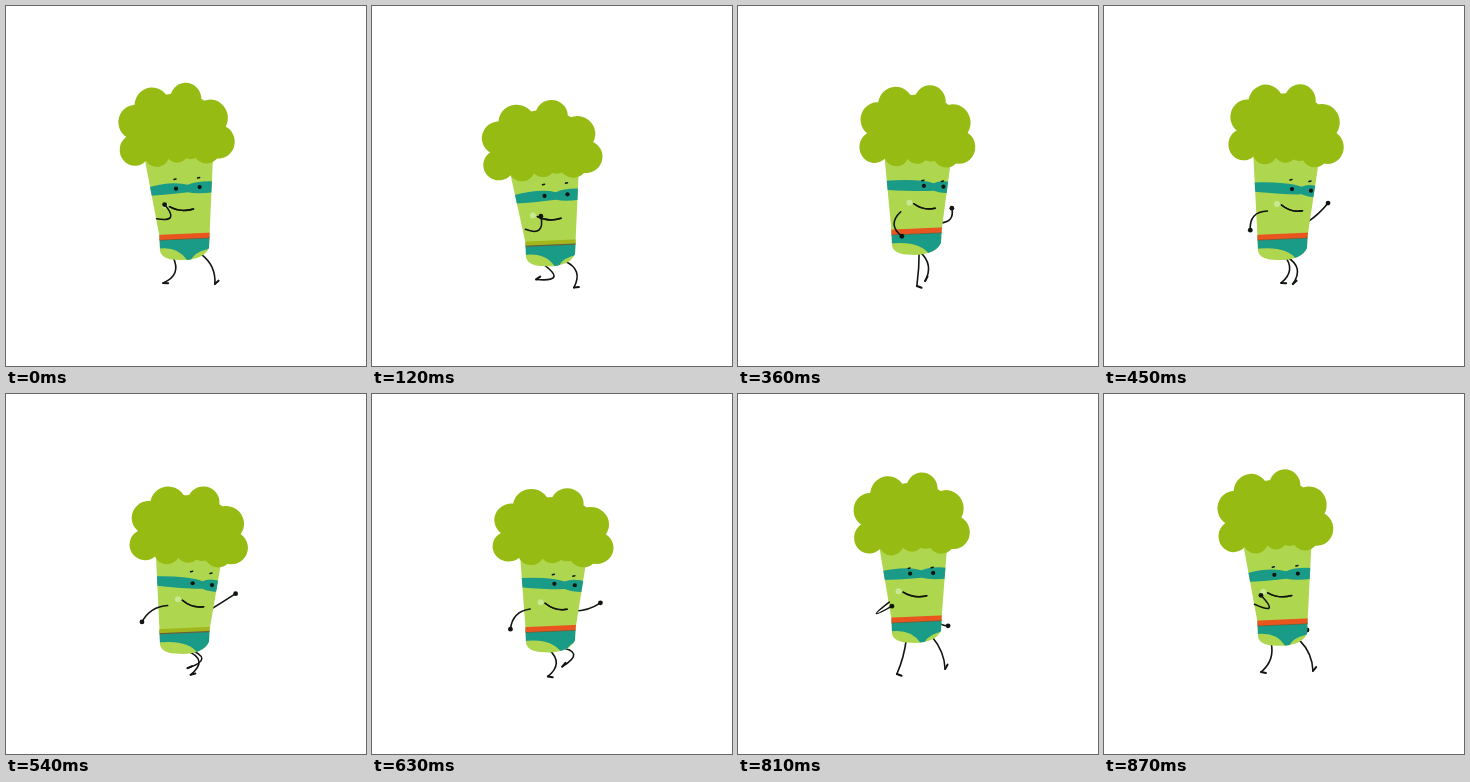
Animation, 360 px wide and 360 px high, one loop 900 ms. Source, as an HTML page with a canvas:

```html
<!DOCTYPE html>
<html lang="en">
<head>
<meta charset="utf-8">
<title>Jogging broccoli</title>
<style>
html, body { margin: 0; width: 100%; height: 100%; overflow: hidden; background: #fff; }
canvas { display: block; }
</style>
</head>
<body>
<canvas id="stage" width="360" height="360"></canvas>
<script>
const ctx = document.getElementById('stage').getContext('2d');
const LOOP = 900, STEP = 30;
const INK = '#10150f', HAIR = '#96bc14', STEM = '#afd64f', TEAL = '#199b88';
const BELT = '#e8551f', OLIVE = '#a3b71c', SEAM = '#6b6038', CHEEK = '#c8e892';

// Hair lobes around the hair centre: x, y, radius
const LOBES = [
  [-22, -22, 18], [13, -25, 16], [36, -4, 18], [42, 20, 16.5], [-41, -8, 17],
  [-44, 19, 15.5], [-22, 25, 13], [-1, 24, 12], [13, 21, 13], [29, 26, 14]
];

// Cosine around a mean that peaks at the given time, `beats` times per loop.
function wave(time, mean, amp, peak, beats = 1) {
  return mean + amp * Math.cos((time - peak) / LOOP * beats * 2 * Math.PI);
}

function stroke(width, color, trace) {
  ctx.beginPath();
  trace();
  ctx.lineWidth = width;
  ctx.strokeStyle = color;
  ctx.stroke();
}

function line(width, color, x1, y1, x2, y2) {
  stroke(width, color, () => { ctx.moveTo(x1, y1); ctx.lineTo(x2, y2); });
}

function oval(color, x, y, rx, ry = rx) {
  ctx.fillStyle = color;
  ctx.beginPath();
  ctx.ellipse(x, y, rx, ry, 0, 0, 7);
  ctx.fill();
}

// A limb bows out sideways the more its ends come together.
function limb(x1, y1, x2, y2, reach, bend) {
  const dx = x2 - x1, dy = y2 - y1, d = Math.hypot(dx, dy);
  const bow = 2 * bend * Math.max(0, reach - d) / d;
  stroke(1.6, INK, () => {
    ctx.moveTo(x1, y1);
    ctx.quadraticCurveTo((x1 + x2) / 2 + dy * bow, (y1 + y2) / 2 - dx * bow, x2, y2);
  });
}

function drawLeg(time, hipShift, footShift, hipY) {
  const x = wave(time, 193, 16, -20) + footShift, y = wave(time, 277.5, 5, 210);
  const toe = wave(time, -20, 45, 300) * Math.PI / 180;
  limb(wave(time, 188, 8, -10) + hipShift, hipY, x, y, 37, .8);
  line(2, INK, x, y, x + 5 * Math.cos(toe), y + 5 * Math.sin(toe));
}

function drawArm(x1, y1, x2, y2, reach, bend) {
  limb(x1, y1, x2, y2, reach, bend);
  oval(INK, x2, y2, 2.4);
}

function drawHair(x, y, squash, tilt) {
  ctx.save();
  ctx.translate(x, y);
  ctx.scale(1 + squash, 1 - squash);
  ctx.rotate(tilt * Math.PI / 180);
  oval(HAIR, 0, 0, 43, 32);
  LOBES.forEach(lobe => oval(HAIR, ...lobe));
  ctx.restore();
}

function drawPants(belt, bottom, crotch) {
  ctx.fillStyle = TEAL;
  ctx.beginPath();
  ctx.moveTo(150, belt);
  ctx.lineTo(150, bottom - 11);
  ctx.quadraticCurveTo(crotch - 12, bottom - 15, crotch - 2, bottom);
  ctx.lineTo(crotch + 2, bottom);
  ctx.quadraticCurveTo(crotch + 6, bottom - 9, 207, bottom - 12);
  ctx.lineTo(207, belt);
  ctx.fill();
  const low = bottom > 259.5;
  line(1.5, SEAM, 150, belt + 3.5, 207, belt + 1);
  line(low ? 4 : 5, low ? OLIVE : BELT, 150, belt + 1, 207, belt - 1.5);
}

function drawMask(maskAt, eye1, eye2) {
  const bridge = (eye1 + eye2) / 2;
  ctx.fillStyle = TEAL;
  ctx.beginPath();
  ctx.moveTo(140, maskAt(140) - 3.5);
  ctx.quadraticCurveTo(eye1 - 5, maskAt(eye1) - 9, bridge, maskAt(bridge) - 4);
  ctx.quadraticCurveTo(eye2, maskAt(eye2) - 9, 220, maskAt(220) - 4);
  ctx.lineTo(220, maskAt(220) + 4);
  ctx.quadraticCurveTo(eye2, maskAt(eye2) + 7, bridge, maskAt(bridge) + 3.5);
  ctx.quadraticCurveTo(eye1 - 5, maskAt(eye1) + 5, 140, maskAt(140) + 4.5);
  ctx.fill();
}

function draw(time) {
  const bounce = (mean, amp, peak) => wave(time, mean, amp, peak, 2);
  const sway = wave(time, 0, 1, 520), turn = wave(time, 0, 1, 460);
  const hairX = 176.3 + 7.5 * sway;
  const hairY = bounce(127, 8, 162) - wave(time, 0, 2, 0, 4);
  const bottom = bounce(254.5, 5.8, 119), belt = bottom - 23.5;
  const eye1 = 179 + 9 * turn, eye2 = 200.3 + 6.7 * turn;
  const maskY = bounce(186, 5.5, 144), mouthY = bounce(206, 6.5, 162);
  const maskAt = x => maskY + (.5 + 5 * sway) * (x - hairX) / 60;

  ctx.fillStyle = '#fff';
  ctx.fillRect(0, 0, 360, 360);
  ctx.lineCap = ctx.lineJoin = 'round';

  drawArm(202, 217, wave(time, 212, 18, 570), wave(time, 217, 20, 15), 33, -.4);
  drawLeg(time, 0, 0, bottom - 5);
  drawLeg(time + LOOP / 2, -13, -20, bottom - 3);

  // Stem; everything worn on it is clipped to its outline.
  ctx.save();
  ctx.beginPath();
  ctx.moveTo(143.5 + 6.5 * sway, hairY + 28);
  ctx.lineTo(153.5, belt);
  ctx.lineTo(154, bottom - 9);
  ctx.quadraticCurveTo(156, bottom, 173, bottom);
  ctx.quadraticCurveTo(197, bottom + 1, 203, bottom - 12);
  ctx.lineTo(203.5, belt);
  ctx.lineTo(211.5 + 5 * sway, hairY + 28);
  ctx.fillStyle = STEM;
  ctx.fill();
  ctx.clip();
  drawPants(belt, bottom, 189 + 6 * turn);
  drawMask(maskAt, eye1, eye2);

  const mouthL = 170.5 + 7 * turn, mouthR = 193 + 5.5 * turn;
  const slope = wave(time, 2, 1.2, 560);
  oval(CHEEK, mouthL - 4.5, mouthY - slope - 1, 3);
  ctx.restore();

  const browGap = bounce(8, 3.5, 90);
  for (const x of [eye1, eye2]) {
    const y = maskAt(x) - 1;
    oval(INK, x, y, 2.1);
    line(1.5, INK, x - 2, y - browGap, x, y - browGap - .5);
  }

  // The smile opens briefly into a second lip line.
  const open = Math.max(0, wave(time, -7, 10, 240));
  for (const depth of [5, 5 + 2 * open]) {
    stroke(1.5, INK, () => {
      ctx.moveTo(mouthL, mouthY - slope);
      ctx.quadraticCurveTo((mouthL + mouthR) / 2 - 1, mouthY + depth, mouthR, mouthY + slope);
    });
  }

  drawHair(hairX, hairY, bounce(0, .025, 190), -2.5 + 4 * sway);

  // The near hand traces a figure with one extra swing per loop.
  const swing = bounce(0, 1, 287);
  drawArm(wave(time, 157, 6.5, 430), mouthY + wave(time, 7, 5, 100),
    wave(time, 156, 18, 175) + 5.5 * swing,
    mouthY + wave(time, 16, 13, 475) + 10 * swing, 39, -.5);
}

function tick(now) {
  let time = Math.floor(now % LOOP / STEP) * STEP;
  // Every sixth pose is held for two steps.
  if (time > STEP && time % 180 === STEP) time -= STEP;
  draw(time);
  requestAnimationFrame(tick);
}
requestAnimationFrame(tick);
</script>
</body>
</html>
```
